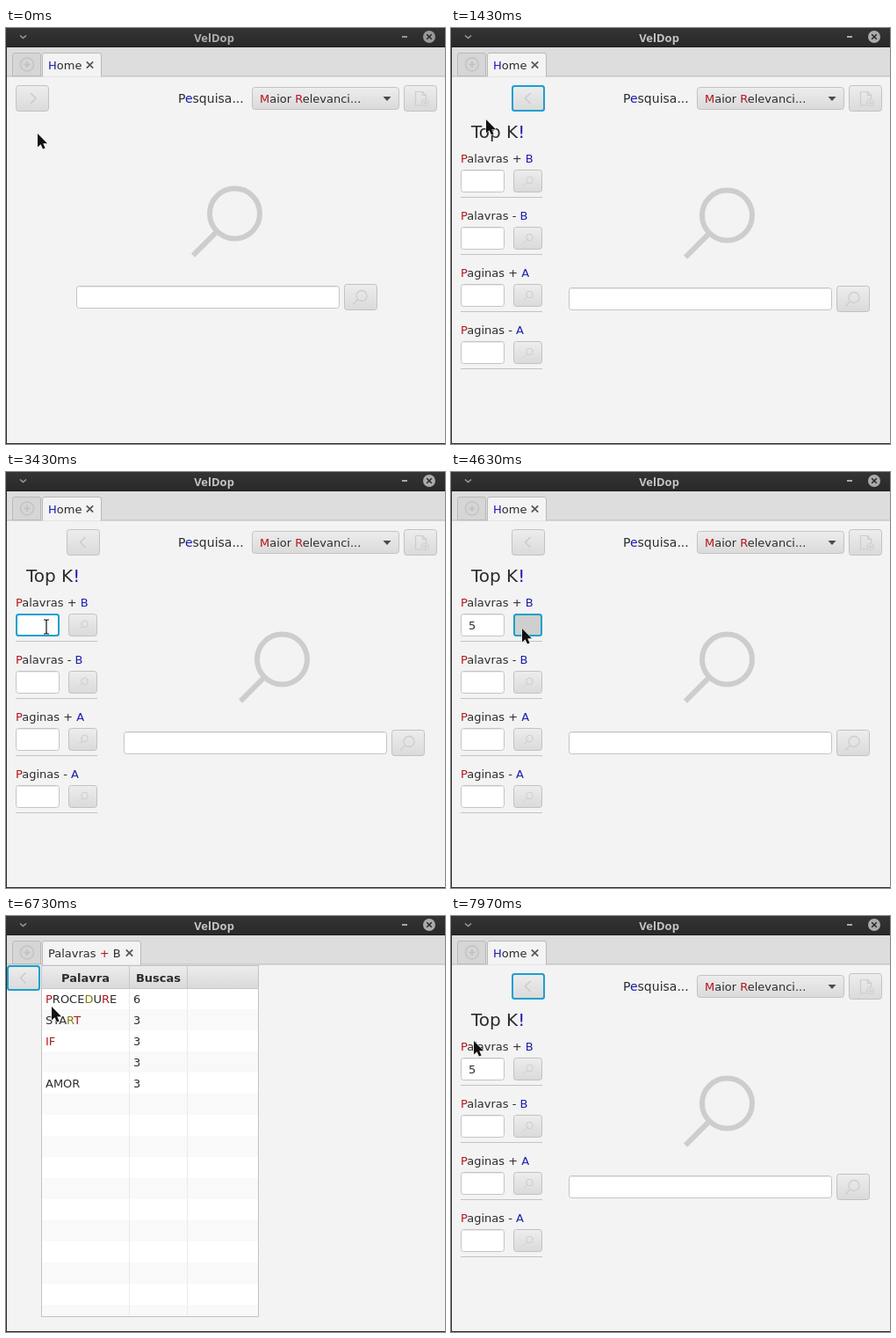
An HTML page for the animation above (8 s loop, 500 by 473 pixels).

```html
<!DOCTYPE html>
<html lang="pt">
<head>
<meta charset="utf-8">
<title>VelDop</title>
<style>
html, body { margin: 0; width: 100%; height: 100%; overflow: hidden; background: #f3f3f3; }
svg { display: block; width: 100%; height: 100%; }
text { font: 13px "DejaVu Sans", sans-serif; fill: #2c2c2c; white-space: pre; }
.bold { font-weight: bold; }
.r { fill: #b3161c; }
.b { fill: #1c1cae; }
.g { fill: #7d7a12; }
.icon { fill: none; stroke: #cdcdcd; }
.ring { fill: none; stroke: #1a9fd0; stroke-width: 2; }
</style>
</head>
<body>
<svg id="stage" viewBox="0 0 500 473" preserveAspectRatio="none"></svg>
<script>
const LOOP = 8000;
const stage = document.getElementById('stage');

const rect = (x, y, w, h, fill, extra = '') =>
  `<rect x="${x}" y="${y}" width="${w}" height="${h}" fill="${fill}" ${extra}/>`;
const line = (d, color, width = 1, extra = '') =>
  `<path d="${d}" fill="none" stroke="${color}" stroke-width="${width}" ${extra}/>`;
const group = (id, body, extra = '') => `<g id="${id}" ${extra}>${body}</g>`;

// "r:P|alavras" colours the pieces that carry a class prefix
const text = (x, y, s, extra = '') => `<text x="${x}" y="${y}" ${extra}>` +
  s.split('|').map(p => p[1] === ':' ? `<tspan class="${p[0]}">${p.slice(2)}</tspan>` : p).join('') + '</text>';

const ring = (id, x, y, w, h) =>
  `<rect id="${id}" class="ring" x="${x + 1}" y="${y + 1}" width="${w - 2}" height="${h - 2}" rx="2.5"/>`;
const button = (x, y, w, h, id = '') =>
  rect(x + .5, y + .5, w - 1, h - 1, 'url(#face)', `rx="3" stroke="#c2c2c2" ${id && `id="${id}"`}`);
const field = (x, y, w, h) =>
  rect(x + .5, y + .5, w - 1, h - 1, '#fff', 'rx="3" stroke="#c4c4c4"') +
  line(`M${x + 2} ${y + 1.5}h${w - 4}`, '#e9e9e9');
const lens = (x, y, r, w, tail) =>
  `<g class="icon" stroke-width="${w}"><circle cx="${x}" cy="${y}" r="${r}"/>` +
  `<path d="M${x - r * .72} ${y + r * .72}l${-tail} ${tail}"/></g>`;
const cross = (x, y, r, color, w) =>
  line(`M${x - r} ${y - r}l${2 * r} ${2 * r}m0 ${-2 * r}l${-2 * r} ${2 * r}`, color, w);

const tab = (w, label) =>
  `<path d="M41.5 55.5V31q0-2.500 2.500-2.500h${w - 6}q2.500 0 2.500 2.500V55.500" fill="#f3f3f3" stroke="#b9b9b9"/>` +
  text(48, 47, label) + cross(41 + w - 13.5, 42, 3.7, '#555', 1.7);

const defs = `<defs>
  <linearGradient id="face" x2="0" y2="1"><stop stop-color="#ededed"/><stop offset="1" stop-color="#dadada"/></linearGradient>
  <linearGradient id="bar" x2="0" y2="1"><stop stop-color="#343434"/><stop offset="1" stop-color="#292929"/></linearGradient>
  <clipPath id="reveal"><rect id="curtain" x="10" y="97" width="96" height="300"/></clipPath>
</defs>`;

const frame =
  rect(0, 0, 500, 473, '#f3f3f3') +
  rect(0, 22, 500, 33, '#dddddd') + line('M0 55H500', '#b9b9b9') +
  rect(0, 0, 500, 22, 'url(#bar)') + line('M0 21.5H500', '#1d1d1d') +
  line('M16 8.500l3.500 3l3.500-3', '#9a9a9a', 1.6) +
  group('controls',
    text(237, 16, 'VelDop', 'text-anchor="middle" style="font:bold 13px \'Open Sans\',sans-serif;fill:#c4c4c4"') +
    rect(451, 9, 6, 2, '#aaa') + '<circle cx="482" cy="10" r="7" fill="#ababab"/>' +
    cross(482, 10, 2.8, '#2b2b2b', 1.6)) +
  `<path d="M7.500 54.500V31q0-2.500 2.500-2.500h27q2.500 0 2.500 2.500V54.500z" fill="#d6d6d6" stroke="#b9b9b9"/>` +
  `<g class="icon" style="stroke:#c3c3c3"><circle cx="24" cy="41.500" r="7.500" stroke-width="1.500"/>` +
  '<path d="M24 38v7m-3.500-3.500h7" stroke-width="2"/></g>';

const toolbar =
  text(196, 85, 'P|b:e|squisa...', 'style="font-size:14px"') +
  button(280, 67, 168, 26) + text(289, 85, 'r:M|aior |r:R|elevanci...') +
  '<path d="M429.500 78h9l-4.500 5z" fill="#4a4a4a"/>' +
  button(453, 65, 38, 30) +
  '<g class="icon"><path d="M473 88h-6.500V72.500h8l4 4v4M474.500 72.500v4h4" stroke-width="1.200"/>' +
  '<circle cx="477.500" cy="85" r="4"/><path d="M477.500 82.500v5m-2.500-2.500h5"/></g>';

const nav = button(0, 65, 38, 30) + line('', '#cbcbcb', 1.5, 'id="chevron"') + ring('navRing', 0, 65, 38, 30);

const query = (label, i) => {
  const y = 65 * i;
  return text(11, 153 + y, label) + field(11, 161 + y, 50, 26) +
    button(71, 161 + y, 33, 26, i ? '' : 'go') + lens(89.5, 173 + y, 3.8, 1, 3.5) +
    line(`M11 ${192.5 + y}H104`, '#c3c3c3');
};
const panel = text(23, 125, 'Top K|b:!', 'style="font-size:20px"') +
  ['r:P|alavras + |b:B', 'r:P|alavras - |b:B', 'r:P|aginas + |b:A', 'r:P|aginas - |b:A'].map(query).join('') +
  ring('goRing', 71, 161, 33, 26) + ring('fieldRing', 11, 161, 50, 26) +
  text(20, 179, '5', 'id="digit"') + rect(19.5, 167, 1, 14, '#222', 'id="caret"');

const search = lens(260.5, 211, 28.5, 6, 27) +
  field(80, 293, 300, 26) + button(385, 291, 38, 30) + lens(405, 304.5, 6, 1.3, 5.5);

const home = tab(68, 'b:H|ome') + toolbar + group('search', search) +
  group('panel', panel, 'clip-path="url(#reveal)"') + group('nav', nav);

const words = ['r:P|ROCE|g:D|U|r:R|E', 'STA|g:R|r:T', 'r:IF', '', 'AMOR'];
const rows = Array.from({ length: 16 }, (_, i) => {
  const y = 82 + 24 * i, h = Math.min(24, 455 - y);
  return rect(41, y, 246, h, i % 2 ? '#f9f9f9' : '#fff') +
    (h === 24 ? line(`M41 ${y + 24.5}H287`, '#ededed') : '') +
    (i < 5 ? text(45, y + 17, words[i]) + text(145, y + 17, i ? '3' : '6') : '');
}).join('');

const table = tab(113, 'Palavras |r:+| B') +
  button(1, 56, 38, 29, 'back') + line('M22.500 64.500l-6 6l6 6', '#cbcbcb', 1.5) + ring('backRing', 1, 56, 38, 29) +
  rows + line('M140.500 82V455M206.500 82V455', '#ebebeb') +
  rect(41, 56, 246, 26, 'url(#face)') + line('M41 82.500H287M140.500 57V82M206.500 57V82', '#c6c6c6') +
  text(90.5, 75, 'Palavra', 'class="bold" text-anchor="middle"') +
  text(173.5, 75, 'Buscas', 'class="bold" text-anchor="middle"') +
  rect(40.5, 56.5, 247, 399, 'none', 'stroke="#c3c3c3"');

const pointer =
  '<path id="arrow" d="M0 0V15.500L3.600 12.200L6 17.600L8.600 16.500L6.200 11.200H11z" fill="#111" stroke="#fff" stroke-width="1" stroke-linejoin="round" paint-order="stroke"/>' +
  '<path id="beam" d="M-3-8h2l1 1l1-1h2M0-7V7M-3 8h2l1-1l1 1h2" fill="none" stroke="#111" stroke-width="1.200"/>';

stage.innerHTML = defs + frame + group('home', home) + group('table', table) +
  line('M.500 22V473M0 472.500H500', '#2b2b2b') + group('pointer', pointer);

const el = {};
stage.querySelectorAll('[id]').forEach(n => el[n.id] = n);
const show = (name, on) => el[name].setAttribute('display', on ? 'inline' : 'none');
const set = (name, attr, value) => el[name].setAttribute(attr, value);

// time, x, y of the pointer tip
const path = [
  [0, 36, 120], [30, 36, 120], [70, 37, 122], [330, 37, 122], [630, 31, 80],
  [1100, 31, 80], [1430, 40, 104], [1770, 25, 115], [1830, 24, 126], [1970, 24, 126],
  [2230, 71, 140], [2430, 50, 172], [2730, 46, 176], [4370, 46, 176], [4470, 81, 178],
  [5570, 81, 178], [5900, 86, 121], [6030, 91, 87], [6200, 92, 87], [6500, 81, 184],
  [6729, 81, 184], [6730, 52, 103], [6830, 6, 84], [6930, 17, 76], [7070, 17, 76],
  [7100, 16, 74], [7840, 16, 74], [7970, 26, 142]
];

function tip(t) {
  const i = path.findIndex(p => p[0] > t);
  if (i < 0) return path[path.length - 1].slice(1);
  const [t0, x0, y0] = path[i - 1], [t1, x1, y1] = path[i];
  const k = (t - t0) / (t1 - t0);
  return [x0 + (x1 - x0) * k, y0 + (y1 - y0) * k].map(Math.round);
}

function draw(t) {
  const within = (a, b) => t >= a && t < b;
  const onTable = within(5170, 7700);
  const open = t >= 1000;
  const k = Math.min(1, Math.max(0, (t - 1000) / 300));
  const slide = k * k * (3 - 2 * k);

  show('home', !onTable);
  show('table', onTable);
  set('controls', 'opacity', t < 330 ? .85 : 1);

  set('nav', 'transform', `translate(${11 + 58 * slide})`);
  set('chevron', 'd', open ? 'M21.500 74l-6 6l6 6' : 'M17 74l6 6l-6 6');
  set('search', 'transform', `translate(${54 * slide} ${2 * slide})`);
  show('panel', open);
  set('curtain', 'width', 96 * slide);

  show('navRing', within(630, 2430) || t >= 7700);
  show('fieldRing', within(2430, 4630));
  show('goRing', within(4630, 5170));
  set('go', 'fill', within(4630, 5170) ? '#cfcfcf' : 'url(#face)');
  set('back', 'fill', within(7530, 7700) ? '#cfcfcf' : 'url(#face)');

  const typed = t >= 3630;
  show('digit', typed);
  show('caret', within(2930, 3430) || within(3630, 4370));
  set('caret', 'x', typed ? 28 : 19.5);

  const [x, y] = tip(t);
  const overField = within(2230, 4470) && x > 11 && x < 61 && y > 161 && y < 187;
  set('pointer', 'transform', `translate(${x} ${y})`);
  show('arrow', !overField);
  show('beam', overField);
}

const start = performance.now();
function tick() {
  draw((performance.now() - start) % LOOP);
  requestAnimationFrame(tick);
}
tick();
</script>
</body>
</html>
```
